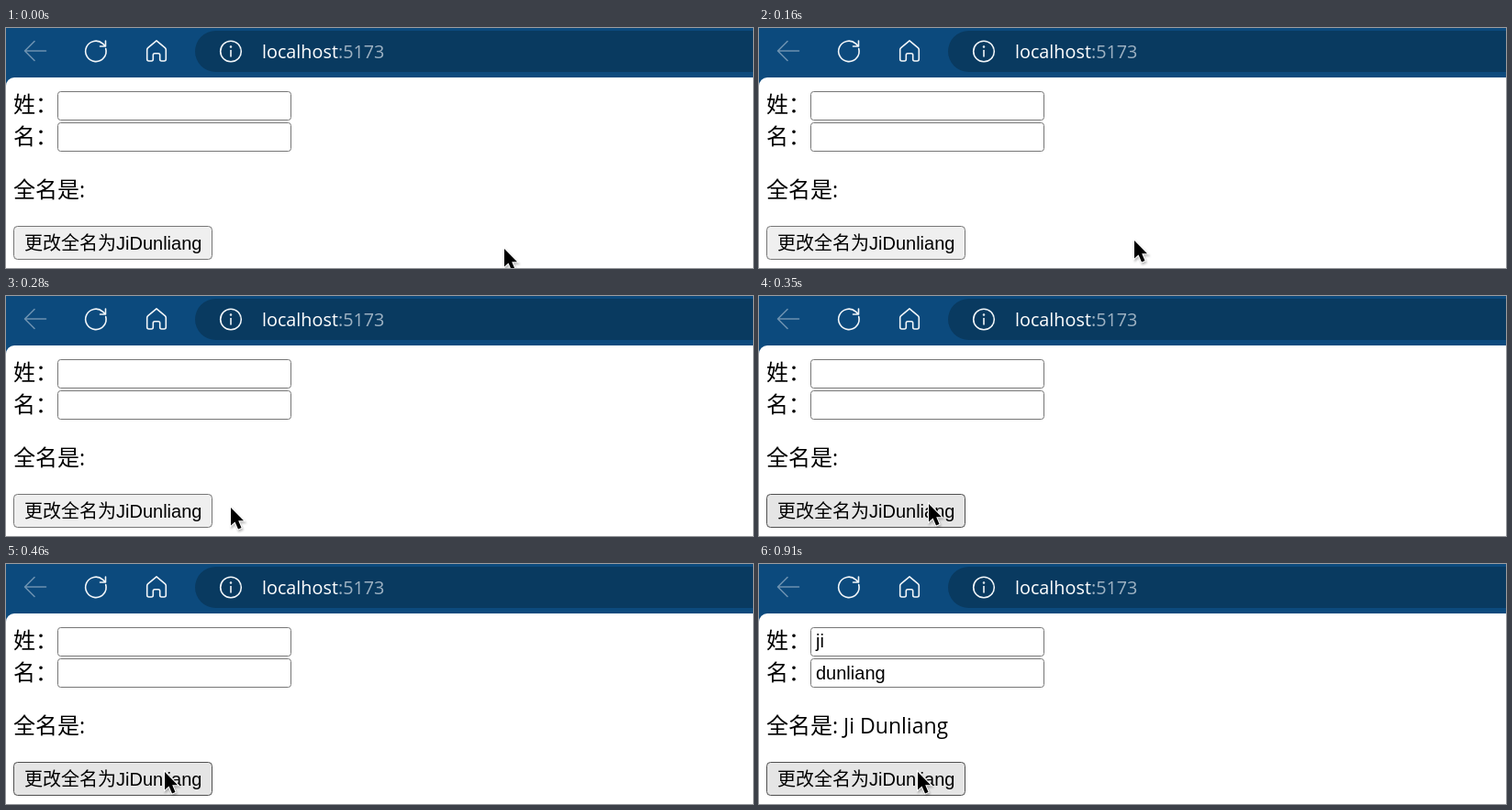
Recreate the animation shown at these times as an HTML page. Size 814 by 262 pixels, loop 2.07 s.

```html
<!DOCTYPE html>
<html lang="zh-CN">
<head>
<meta charset="utf-8">
<style>
  html, body { margin: 0; width: 100%; height: 100%; overflow: hidden; background: #fff; }
  svg { display: block; }
  .icon { fill: none; stroke: #f2f6f9; stroke-width: 1.6; stroke-linecap: round; stroke-linejoin: round; }
  .url { font: 19.8px "Open Sans", "Noto Sans", sans-serif; }
  .label { font: 24px "Noto Sans CJK SC", "Noto Sans CJK", sans-serif; }
  .latin { font: 23px "Open Sans", "Noto Sans", sans-serif; }
  .control { font: 20px "Liberation Sans", "Noto Sans CJK SC", "Noto Sans CJK", sans-serif; }
  .input { fill: #fff; stroke: #767676; }
  #cursor { filter: drop-shadow(1px 2px 1px #0004); }
</style>
</head>
<body>
<svg width="814" height="262" viewBox="0 0 814 262">
  <!-- browser bar -->
  <rect width="814" height="70" fill="#0c4a7d"/>
  <path d="M814 3H228.500a22.500 22.500 0 0 0 0 45H814z" fill="#093a60"/>
  <path d="M0 262V63a9 9 0 0 1 9-9H814V262z" fill="#fff"/>
  <g class="icon">
    <path d="M43.500 25H21M31 14.500L20.500 25L31 35.500" stroke="#6c91b0"/>
    <path d="M108.700 22.500A11.200 11.200 0 1 1 105.500 17.200L108.500 20M108.500 14V20H102.500"/>
    <path d="M164 13.800L173.300 21.600Q174.300 22.500 174.300 23.800V34Q174.300 36 172.300 36H169.500Q167.700 36 167.700 34V29.500Q167.700 27.700 166 27.700H162Q160.300 27.700 160.300 29.500V34Q160.300 36 158.500 36H155.700Q153.700 36 153.700 34V23.800Q153.700 22.500 154.700 21.600Z"/>
    <circle cx="245" cy="25.500" r="11.300"/>
    <path d="M245 24.500V31"/>
    <circle cx="245" cy="20.500" r=".5"/>
  </g>
  <text class="url" x="279" y="33" fill="#fff">localhost<tspan fill="#9db1c2">:5173</tspan></text>

  <!-- form -->
  <g class="label">
    <text x="8" y="92">姓：</text>
    <text x="8" y="127">名：</text>
    <text x="8" y="184.500">全名是<tspan id="full" class="latin" x="80">:</tspan></text>
  </g>
  <rect class="input" x="56.500" y="69.500" width="254" height="31" rx="3"/>
  <rect class="input" x="56.500" y="103.500" width="254" height="31" rx="3"/>
  <rect id="button" x="8.500" y="216.500" width="216" height="36" rx="4"/>
  <g class="control">
    <text id="last" x="62" y="91"></text>
    <text id="first" x="62" y="126"></text>
    <text x="20" y="242">更改全名为JiDunliang</text>
  </g>

  <path id="cursor" d="M0 0V19.500L4.500 15.500L8 23.500L11.500 22L8.200 14.200H14Z" stroke="#fff" stroke-width="2" paint-order="stroke"/>
  <circle id="press" cx="173" cy="230" r="19" fill="#f7e600" fill-opacity=".6"/>
</svg>
<script>
const LOOP = 2070, PRESS = 810, ACTIVE = 850, RELEASE = 910;
const el = id => document.getElementById(id);

// pointer path: time, x, y, horizontal speed in px/ms
const path = [
  [0, 543, 241, -.3],
  [160, 409, 232, -1.35],
  [280, 245, 231, -1.1],
  [350, 185, 227, -.3],
  [460, 173, 227, 0]
];
const ticks = [0, 30, 60, 100, 130, 160, 180, 210, 250, 280, 320, 350, 390, 420, 460];

function pointer(t) {
  const i = Math.max(1, path.findIndex(k => k[0] >= t));
  const [t0, x0, y0, v0] = path[i - 1], [t1, x1, y1, v1] = path[i];
  const d = t1 - t0, s = (t - t0) / d, r = 1 - s;
  const x = r * r * (1 + 2 * s) * x0 + s * s * (3 - 2 * s) * x1 + d * s * r * (r * v0 - s * v1);
  return [Math.round(x), Math.round(y0 + (y1 - y0) * s)];
}

function draw(now) {
  const t = now % LOOP;
  const [x, y] = pointer(ticks.filter(k => k <= t).pop());
  const pressed = t >= PRESS && t < RELEASE, filled = t >= RELEASE;
  const [fill, stroke] = pressed && t >= ACTIVE ? ["#f5f5f5", "#8d8d8d"]
    : x < 225 ? ["#e5e5e5", "#4f4f4f"] : ["#efefef", "#767676"];

  el("cursor").setAttribute("transform", `translate(${x} ${y})`);
  el("button").setAttribute("fill", fill);
  el("button").setAttribute("stroke", stroke);
  el("press").style.display = pressed ? "" : "none";
  el("last").textContent = filled ? "ji" : "";
  el("first").textContent = filled ? "dunliang" : "";
  el("full").textContent = filled ? ": Ji Dunliang" : ":";
}

const start = performance.now();
function frame() {
  draw(performance.now() - start);
  requestAnimationFrame(frame);
}
frame();
</script>
</body>
</html>
```
